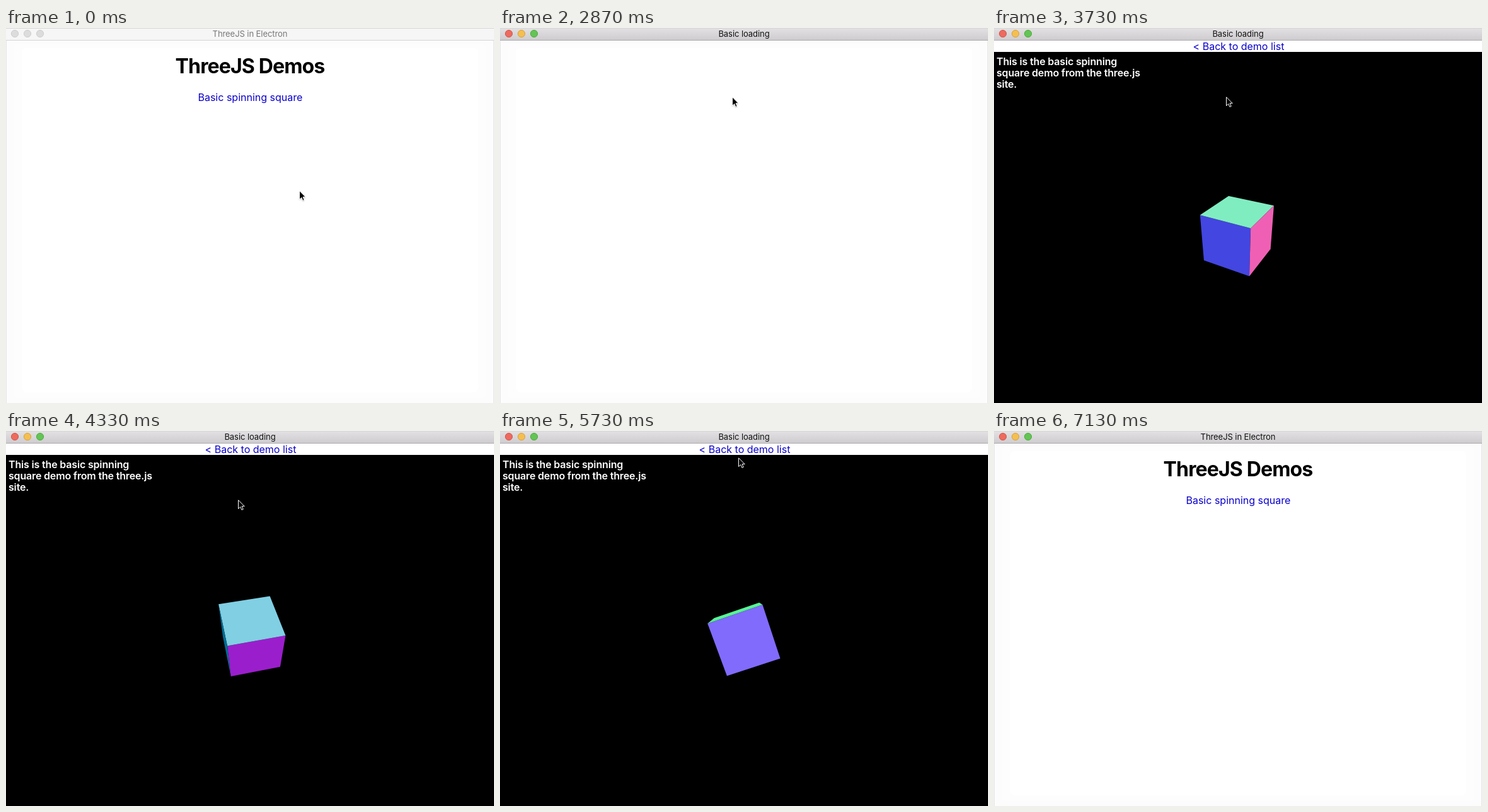
Animation of 774 by 596 pixels, one loop 7190 ms. Source, as an HTML page:

```html
<!DOCTYPE html>
<html lang="en">
<head>
<meta charset="utf-8">
<title>ThreeJS in Electron</title>
<style>
  html, body { margin: 0; width: 100%; height: 100%; overflow: hidden; background: #fff; }
  svg { display: block; width: 774px; height: 596px; font: 16px Inter, "Open Sans", sans-serif; }
  .mid { text-anchor: middle; }
  .link { fill: #0a00cd; }
  h1, .head { font-size: 32px; font-weight: 700; letter-spacing: -0.85px; }
  .info { fill: #fff; font-weight: 600; letter-spacing: -0.17px; }
  #title { font-size: 13px; letter-spacing: -0.07px; }
</style>
</head>
<body>
<svg viewBox="0 0 774 596">
  <defs>
    <linearGradient id="bar" x2="0" y2="1">
      <stop stop-color="#e3e1e3"/><stop offset="1" stop-color="#cdcbcd"/>
    </linearGradient>
    <filter id="soft" x="-50%" y="-50%" width="200%" height="200%">
      <feGaussianBlur stdDeviation="1"/>
    </filter>
    <path id="arrow" d="M.5 .8V14.6L3.7 11.6L5.9 16.4L8.2 15.4L6 10.7H10.2Z"/>
  </defs>

  <rect width="774" height="596" fill="#fcfcfc"/>
  <rect x="13" y="26" width="748" height="562" rx="5" fill="#fdfdfd"/>
  <rect x="25" y="32" width="724" height="547" rx="8" fill="#fff"/>
  <path d="M.5 20V596M773.5 20V596" stroke="#e6e6e6"/>

  <g id="list">
    <text class="mid head" x="387" y="72">ThreeJS Demos</text>
    <text class="mid link" x="387.4" y="116">Basic spinning square</text>
  </g>

  <g id="demo">
    <rect y="20" width="774" height="18" fill="#fff"/>
    <rect y="38" width="774" height="558"/>
    <text class="mid link" x="388" y="35">&lt; Back to demo list</text>
    <text class="info" y="59"><tspan x="4">This is the basic spinning</tspan><tspan x="4" dy="18">square demo from the three.js</tspan><tspan x="4" dy="18">site.</tspan></text>
    <g id="cube"></g>
  </g>

  <rect id="chrome" width="774" height="20"/>
  <path id="rule" d="M0 19.5H774"/>
  <path id="shine" d="M0 .5H774" stroke="#d6d6d6"/>
  <g id="lights"></g>
  <text id="title" class="mid" x="387" y="14"></text>

  <g id="cursor">
    <use href="#arrow" y="1.2" opacity=".35" filter="url(#soft)"/>
    <use href="#arrow" stroke="#fff"/>
  </g>
</svg>
<script>
const LOOP = 7190, STEP = 200 / 3;
const FOCUS = 1600, RETITLE = 2660, BLANK = 2800, OPEN = 2930, BACK = 6000, LEAVE = 6460;
const SPIN_START = 2840, FOCAL = 409, CX = 387.5, CY = 326.5, CAMERA_Z = 5;

// time, x, y
const PATH = [
  [0, 465, 258], [550, 465, 258], [1470, 370, 120], [2000, 370, 120],
  [2530, 368, 109], [4550, 368, 109], [5530, 378, 42], [5730, 378, 42],
  [5870, 380, 26], [6050, 380, 26], [6400, 472, 60]
];
const LIGHTS = [['#ed6a5f', '#d5544a'], ['#f5bf50', '#d9a13c'], ['#62c554', '#4fa93f']];

const $ = id => document.getElementById(id);
const show = (el, on) => el.style.display = on ? '' : 'none';
const set = (el, attrs) => { for (const k in attrs) el.setAttribute(k, attrs[k]); };
const add = (parent, tag, attrs = {}) => {
  const el = document.createElementNS('http://www.w3.org/2000/svg', tag);
  set(el, attrs);
  return parent.appendChild(el);
};

const lights = LIGHTS.map((_, i) => add($('lights'), 'circle', { cx: 14 + 20 * i, cy: 9, r: 5.6 }));
const faces = Array.from({ length: 6 }, () => add($('cube'), 'polygon'));

function drawCube(t) {
  const a = 0.6 * t, b = 1.2 * t;
  const sa = Math.sin(a), ca = Math.cos(a), sb = Math.sin(b), cb = Math.cos(b);
  const axes = [[cb, sa * sb, -ca * sb], [0, ca, sa], [sb, -sa * cb, ca * cb]];
  const corners = [[1, 1], [1, -1], [-1, -1], [-1, 1]];
  faces.forEach((face, i) => {
    const n = axes[i >> 1].map(v => i % 2 ? -v : v);
    // A face shows when its plane lies between the centre and the camera.
    const visible = n[2] * CAMERA_Z > 0.5;
    show(face, visible);
    if (!visible) return;
    const u = axes[((i >> 1) + 1) % 3], v = axes[((i >> 1) + 2) % 3];
    const points = corners.map(([p, q]) => {
      const [x, y, z] = n.map((c, k) => (c + p * u[k] + q * v[k]) / 2);
      const s = FOCAL / (CAMERA_Z - z);
      return `${(CX + x * s).toFixed(2)},${(CY - y * s).toFixed(2)}`;
    });
    const fill = `rgb(${n.map(c => Math.round(127.5 * (c + 1)))})`;
    set(face, { points: points.join(' '), fill });
  });
}

function cursorAt(t) {
  const i = PATH.findIndex(p => p[0] > t);
  if (i < 0) return PATH[PATH.length - 1].slice(1);
  const [t0, x0, y0] = PATH[i - 1], [t1, x1, y1] = PATH[i];
  const u = (t - t0) / (t1 - t0), e = u * u * (3 - 2 * u);
  return [x0 + (x1 - x0) * e, y0 + (y1 - y0) * e].map(Math.round);
}

function render(t) {
  const active = t >= FOCUS;
  const inDemo = t >= OPEN && t < BACK;
  set($('chrome'), { fill: active ? 'url(#bar)' : '#f6f6f6' });
  set($('rule'), { stroke: active ? '#acaaac' : '#d4d4d4' });
  lights.forEach((c, i) => {
    const [fill, stroke] = active ? LIGHTS[i] : ['#dcdcdc', '#cecece'];
    set(c, { fill, stroke });
  });
  const title = $('title');
  title.textContent = t >= RETITLE && t < BACK ? 'Basic loading' : 'ThreeJS in Electron';
  set(title, { fill: active ? '#111' : '#777' });

  show($('list'), t < BLANK || t >= BACK);
  show($('demo'), inDemo);
  if (inDemo) drawCube((t - SPIN_START) / 1000);

  show($('cursor'), t < LEAVE);
  set($('cursor'), { transform: `translate(${cursorAt(t)})` });
}

const start = performance.now();
function tick() {
  const t = (performance.now() - start) % LOOP;
  render(Math.floor((t + 5) / STEP) * STEP);
  requestAnimationFrame(tick);
}
tick();
</script>
</body>
</html>
```
